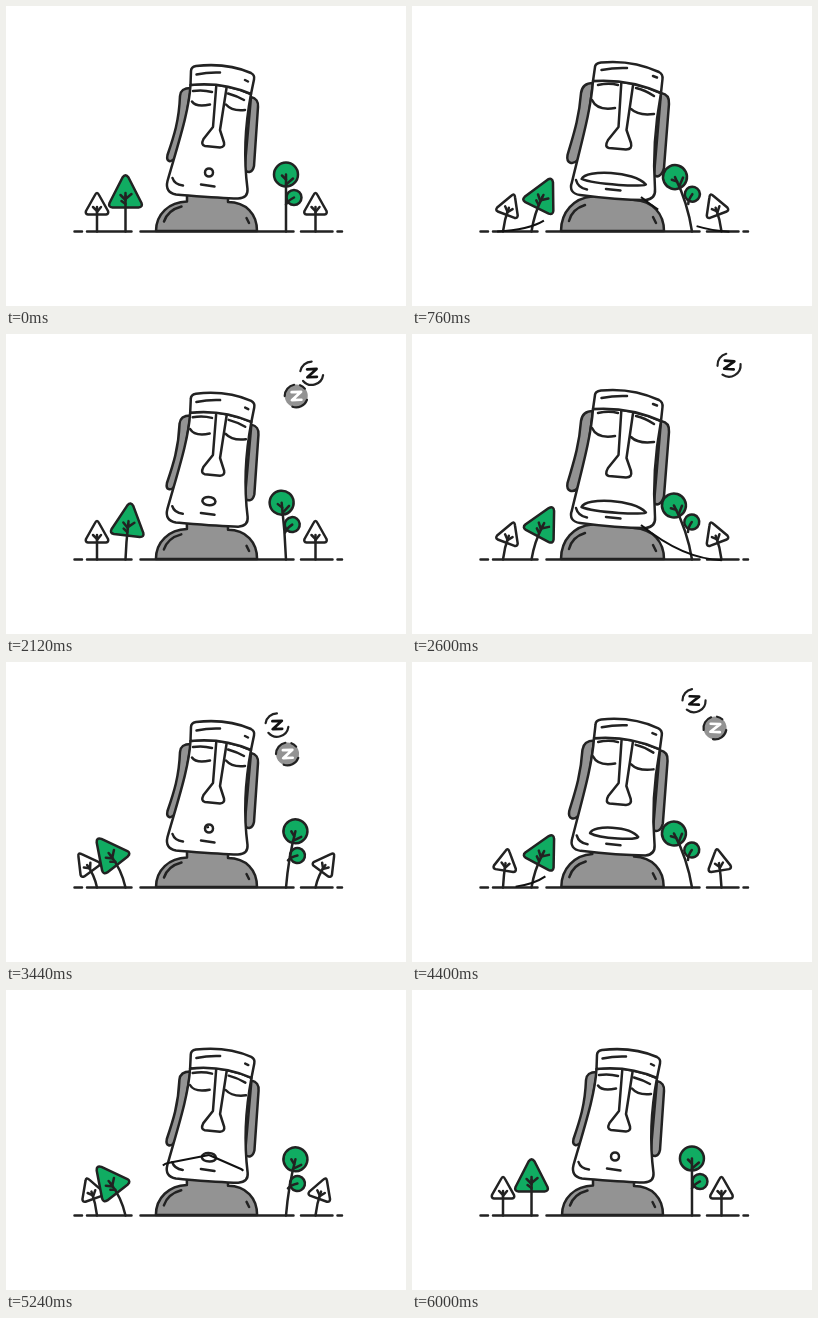
Animation of 400x300 px, one loop 6040 ms. Source, as an HTML page:

```html
<!DOCTYPE html>
<html lang="en">
<head>
<meta charset="utf-8">
<title>Sleeping statue</title>
<style>
html, body { margin: 0; width: 100%; height: 100%; overflow: hidden; background: #fff; }
svg { display: block; width: 100vw; height: 100vh; }
</style>
</head>
<body>
<svg id="stage" viewBox="0 0 400 300" fill="none" stroke="#222" stroke-width="2.500" stroke-linecap="round" stroke-linejoin="round"></svg>
<script>
const LOOP = 6040, BREATH = LOOP / 3;
const GREY = '#939393', GREEN = '#10ac62';
const stage = document.getElementById('stage');

const clamp = v => Math.max(0, Math.min(1, v));
const smooth = v => v * v * (3 - 2 * v);

// Value at time t through [time, value] keys
function track(t, keys, ease = smooth) {
  if (t <= keys[0][0]) return keys[0][1];
  for (let i = 1; i < keys.length; i++) {
    const [t0, a] = keys[i - 1], [t1, b] = keys[i];
    if (t <= t1) return a + (b - a) * ease((t - t0) / (t1 - t0));
  }
  return keys[keys.length - 1][1];
}

// Blend two path strings that share the same commands
function mix(a, b, k) {
  const end = b.match(/-?[\d.]+/g);
  let i = 0;
  return a.replace(/-?[\d.]+/g, n => (+n + (end[i++] - n) * k).toFixed(2));
}

const path = (d, fill = 'none', extra = '') => `<path d="${d}" fill="${fill}" ${extra}/>`;

// Statue parts: [resting path, full-breath path, fill]
const BODY = [
  ['M150 225C150 208 163 196 181 195.500V182L222 187V196C240 196 251 208 251 225Z',
   'M149 225C149 206 162 192 180 190.500V182L222 187V194C241 195 252 208 252 225Z', GREY],
  ['M158 215.500Q162 204 175.500 200.500M240.500 212L243 217', 'M157 215Q160 203 173 199M241 211L244 217']
];
const HEAD = [
  ['M185 82C178 82 174.500 84 174 90C173 115 168 130 161.500 149C160 156 165 157 169 152L177 130Z',
   'M181 77C174 77 170 80 169 87C167 113 161 130 155.500 149C154 158 161 159 166 154L174 130Z', GREY],
  ['M245 91C250 92 252.500 96 252 101L248 160C246.500 167 242 167 238.500 164Z',
   'M249 87C255 88 257.500 92 257 98L252 162C250 170 245 172 242 169Z', GREY],
  ['M184.500 79C183 105 173 135 161.500 175C159.500 183 163 187 170 188.500C190 190 212 192 232 192.500C239 192 242 189 241.500 183C238 156 238 125 245 88Q216 75.500 184.500 79Z',
   'M181 75C179 104 169 138 160 176C157 184 161 188 168 189C190 192 212 194 234 194C241 193 243.500 189 243 183C241 155 242 125 249 87Q217 72.500 181 75Z', '#fff'],
  ['M210.500 77L207 121L197.500 133Q194.500 139 199 140L214 141.500Q219 141 218 136.500L214 124L221 79',
   'M209.500 74L206.500 121L196 134Q192 141 197 142L214 143.500Q220.500 143.500 219 137L214.500 124L221.500 76'],
  ['M185 65Q185 61 190 60Q221 56.500 245 67Q249 69 248 73.500L245 88Q216 75.500 184.500 79Z',
   'M183 61Q183 57.500 189 56.500Q220 53.500 247 66Q251 68 250.500 73L249 87Q217 72.500 181 75Z', '#fff'],
  ['M190.500 68.500Q202 66 214 66.500M239 74L242 75.500', 'M189.500 64Q202 61.500 215 62M241 70L245 71.500'],
  ['M166.500 172Q168.500 178.500 177 179.500M195 178.500L208.500 180.500', 'M164 174Q166 182 175 183.500M194 183L208.500 184.500']
];
const EYES = ['M187 85Q197 83.500 206 86M186 95.500Q190 101.500 204 98.500M222 87.500Q231 90 238 94M220 98.500Q226 105.500 239 104',
              'M186 79Q197 76.500 206 79M180 94Q185 105 203 102M224 82Q233 84 242 90M219 103Q226 110 242 108'];
const MOUTH = ['M199 166.500C199 161.200 207 161.200 207 166.500C207 171.800 199 171.800 199 166.500Z',
               'M169.500 173C174 163 222 165 234 178.500C234 181 183 179 169.500 173Z', '#fff'];

const part = ([a, b, fill], k) => path(mix(a, b, k), fill);

// A stem bent by angle a (degrees), carrying leaves at height h
function tree(x, h, a, leaves, twigs) {
  const tilt = a * Math.PI / 180, lean = tilt * .66;
  const tx = x + h * Math.sin(lean), ty = 225.5 - h * Math.cos(lean);
  const cx = tx - h / 2 * Math.sin(tilt), cy = ty + h / 2 * Math.cos(tilt);
  const top = `transform="translate(${tx} ${ty}) rotate(${a})"`;
  return `<g ${top}>${leaves}</g>` + path(`M${x} 225.5Q${cx} ${cy} ${tx} ${ty}`) +
    `<g ${top}>${path(twigs)}</g>`;
}

const BIG = path('M-3 -18.500Q0 -23 3 -18.500L16 7Q17.500 11 13 11.500H-13Q-17.500 11 -16 7Z', GREEN);
const SMALL = path('M-2 -12Q0 -16 2 -12L11 4Q12 7 9 7.500H-9Q-12 7 -11 4Z', '#fff');
const ROUND = `<circle cx="8" cy="23" r="7.500" fill="${GREEN}"/><circle r="12" fill="${GREEN}"/>`;
const SMALL_TWIGS = 'M0 4L-4 0M0 5L4 0';

const LEAN = [[0, 0], [340, 28], [720, 28], [1150, -38], [1480, -38], [1820, 2], [2000, 0]];
const LATE_LEAN = [[0, 0], [180, 0], [610, 21], [890, 21], [1390, -36], [1500, -36], [1820, 2], [2000, 0]];
const CHEST = [[0, 0], [580, 1], [740, 1], [1340, 0]];

// [path, head start, head end, tail start, tail end]
const WIND = [
  ['M80 226C118 226 138 218 150 195S170 176 190 173', 270, 515, 330, 575],
  ['M318 226C285 228 255 212 229 191', 400, 575, 567, 815],
  ['M68 226C115 226 140 218 148 195C152 180 156 174 162 173L203 165', 610, 980, 680, 1440],
  ['M336 226C290 228 255 212 245 195Q241 182 235 179L203 165', 650, 980, 675, 1390]
];

function wind([d, h0, h1, t0, t1], p) {
  const head = clamp((p - h0) / (h1 - h0)), tail = clamp((p - t0) / (t1 - t0));
  if (head <= tail) return '';
  return path(d, 'none', `pathLength="100" stroke="#111" stroke-width="2" stroke-linecap="butt" stroke-dasharray="0 ${tail * 100} ${(head - tail) * 100} 300"`);
}

// Snores: filled or not, then [time, x, y] stops
const SNORES = [
  [false, [1320, 298, 45], [1440, 299, 44.5], [1920, 301, 42.5], [2600, 317, 31], [3150, 336, 11]],
  [true, [1320, 276, 81], [1440, 277, 79], [2520, 298, 52]],
  [false, [3300, 270, 65], [3440, 271, 63], [3840, 273, 55], [4400, 282, 38.5], [4960, 292, 19]],
  [true, [3300, 279, 95], [3440, 281.5, 92], [4400, 303, 66], [5140, 329, 33]]
];

function snore([filled, ...stops], t) {
  const start = stops[0][0], end = stops[stops.length - 1][0];
  if (t <= start || t >= end) return '';
  const along = i => track(t, stops.map(s => [s[0], s[i]]), v => v);
  const size = Math.min(clamp((t - start) / 100), clamp((end - t) / 100));
  const turn = 10 * Math.sin((t - start) / 300);
  const disc = filled ? `<circle r="11.500" fill="${GREY}" stroke="none"/>` : '';
  const ring = filled
    ? 'M-11.500 1A11.500 11.500 0 0 1 -3 -11M3 -11A11.500 11.500 0 0 1 8 -8M11 3A11.500 11.500 0 0 1 -3 11'
    : 'M-11.500 -1A11.500 11.500 0 0 1 -1 -11.500M11.500 1A11.500 11.500 0 0 1 -8 8.500';
  return `<g transform="translate(${along(1)} ${along(2)}) scale(${size})">${disc}` +
    path(ring, 'none', `transform="rotate(${turn})" stroke-width="2.200"`) +
    path('M-4.500 -4H5L-4.500 4H5', 'none', `transform="rotate(${-turn / 2})" stroke="${filled ? '#fff' : '#111'}" stroke-width="2.700"`) + '</g>';
}

function draw(t) {
  const p = t % BREATH;
  const breath = track(p, CHEST), lean = track(p, LEAN), late = track(p, LATE_LEAN);
  const swing = lean > 0 ? -lean : -lean * .38;
  stage.innerHTML =
    tree(91, 24.5, late, SMALL, SMALL_TWIGS) +
    tree(119.5, 35.5, lean, BIG, 'M0 0V-3M-5 -1L0 4M6 -2L0 3M0 8L-4 5') +
    tree(280, 57, swing, ROUND, 'M0 5L-4 1M0 10L7 4M0 30Q2 26 8 23') +
    tree(309.5, 24.5, -late, SMALL, SMALL_TWIGS) +
    BODY.map(s => part(s, breath)).join('') +
    path('M68.500 225.500H76M81 225.500H125.500M134.500 225.500H287.500M295 225.500H326.500M331.500 225.500H336') +
    HEAD.map(s => part(s, breath)).join('') +
    part(EYES, Math.sqrt(breath)) +
    part(MOUTH, breath) +
    WIND.map(w => wind(w, p)).join('') +
    SNORES.map(s => snore(s, t)).join('');
}

const begin = performance.now();
function frame() {
  draw((performance.now() - begin) % LOOP);
  requestAnimationFrame(frame);
}
frame();
</script>
</body>
</html>
```
